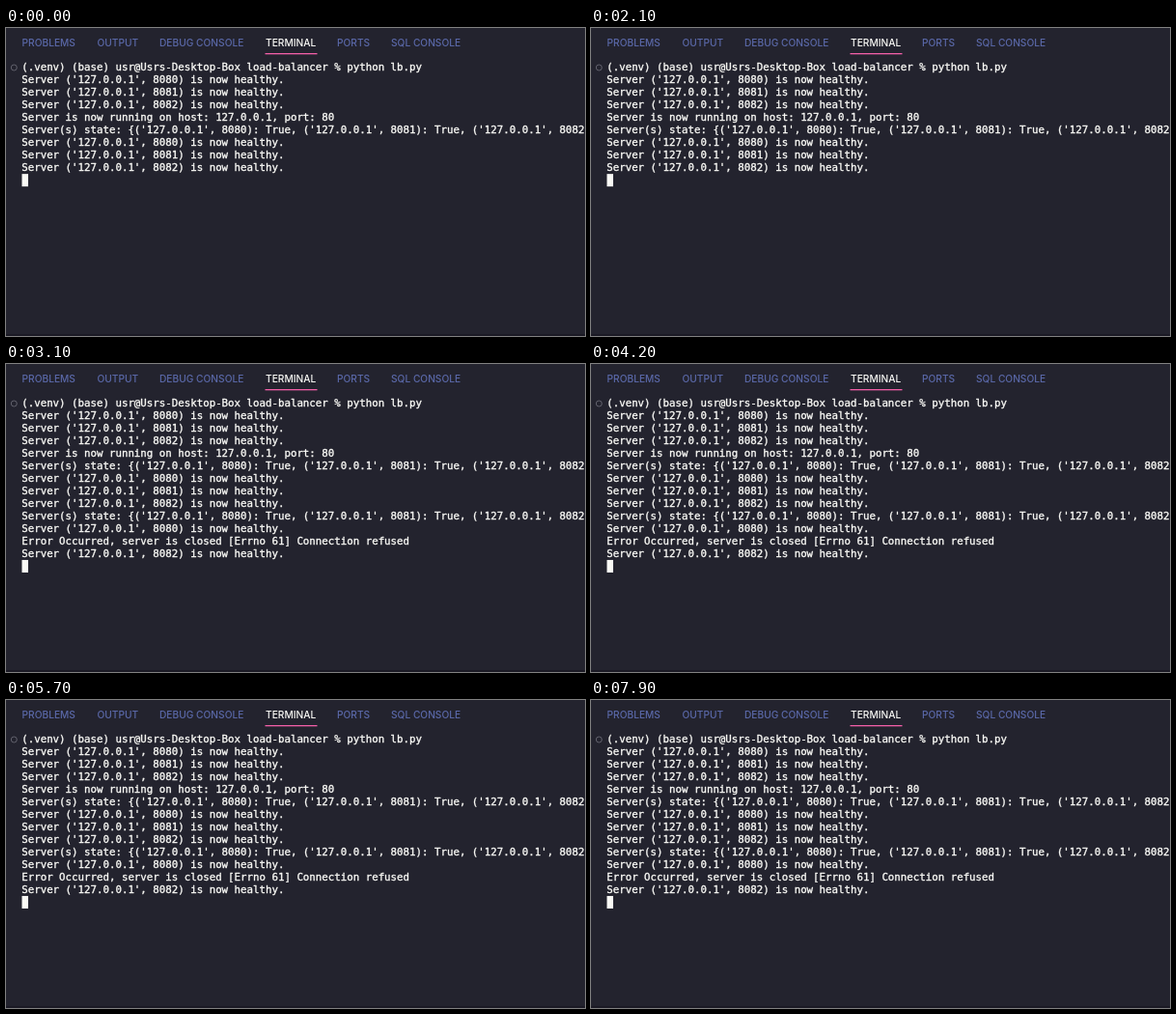
Recreate the animation shown at these times as an HTML page with a canvas. Size 600 px wide and 319 px high, loop 8000 ms.

```html
<!DOCTYPE html>
<html lang="en">
<head>
<meta charset="utf-8">
<title>Load balancer terminal</title>
<style>
  html, body { margin: 0; width: 100%; height: 100%; overflow: hidden; background: #23232e; }
  canvas { display: block; }
</style>
</head>
<body>
<canvas id="stage" width="600" height="319"></canvas>
<script>
const ctx = document.getElementById("stage").getContext("2d");

const LOOP = 8000;
const CHECK_TIME = 2200;
const LEFT = 16.2;
const ROW_TOP = 34.6;
const ROW_HEIGHT = 12.95;
const BASELINE = 9.6;

const COLORS = {
  background: "#23232e",
  footer: "#1b1a25",
  text: "#fafaf6",
  tab: "#5a68a8",
  accent: "#f25fa8",
  marker: "#62626d"
};

const TABS = [
  ["PROBLEMS", 16.5],
  ["OUTPUT", 94.5],
  ["DEBUG CONSOLE", 159],
  ["TERMINAL", 269],
  ["PORTS", 343],
  ["SQL CONSOLE", 399]
];
const ACTIVE_TAB = "TERMINAL";

const PORTS = [8080, 8081, 8082];
const address = port => `('127.0.0.1', ${port})`;
const healthy = port => `Server ${address(port)} is now healthy.`;
const state = `Server(s) state: {${PORTS.map(p => address(p) + ": True").join(", ")}}`;

const startup = [
  "(.venv) (base) usr@Usrs-Desktop-Box load-balancer % python lb.py",
  ...PORTS.map(healthy),
  "Server is now running on host: 127.0.0.1, port: 80",
  state,
  ...PORTS.map(healthy)
];
const afterCheck = [
  ...startup,
  state,
  healthy(8080),
  "Error Occurred, server is closed [Errno 61] Connection refused",
  healthy(8082)
];

function drawTabs() {
  ctx.font = "500 10.2px Inter, sans-serif";
  for (const [label, x] of TABS) {
    ctx.fillStyle = label === ACTIVE_TAB ? COLORS.text : COLORS.tab;
    ctx.fillText(label, x, 19);
  }
  ctx.fillStyle = COLORS.accent;
  ctx.fillRect(268.5, 26, 54, 1.3);
}

function drawTerminal(lines) {
  ctx.strokeStyle = COLORS.marker;
  ctx.lineWidth = 1;
  ctx.beginPath();
  ctx.arc(8.3, 41, 3, 0, Math.PI * 2);
  ctx.stroke();

  // A thin outline gives the text its medium weight.
  ctx.font = '10.77px "DejaVu Sans Mono", monospace';
  ctx.fillStyle = ctx.strokeStyle = COLORS.text;
  ctx.lineWidth = 0.35;
  ctx.lineJoin = "round";
  lines.forEach((line, row) => {
    const y = Math.round(ROW_TOP + row * ROW_HEIGHT + BASELINE);
    ctx.fillText(line, LEFT, y);
    ctx.strokeText(line, LEFT, y);
  });
  ctx.fillRect(16.5, ROW_TOP + lines.length * ROW_HEIGHT, 6.5, 13);
}

function render(now) {
  ctx.fillStyle = COLORS.background;
  ctx.fillRect(0, 0, 600, 319);
  ctx.fillStyle = COLORS.footer;
  ctx.fillRect(0, 317, 600, 2);
  drawTabs();
  drawTerminal(now % LOOP < CHECK_TIME ? startup : afterCheck);
  requestAnimationFrame(render);
}

requestAnimationFrame(render);
</script>
</body>
</html>
```
